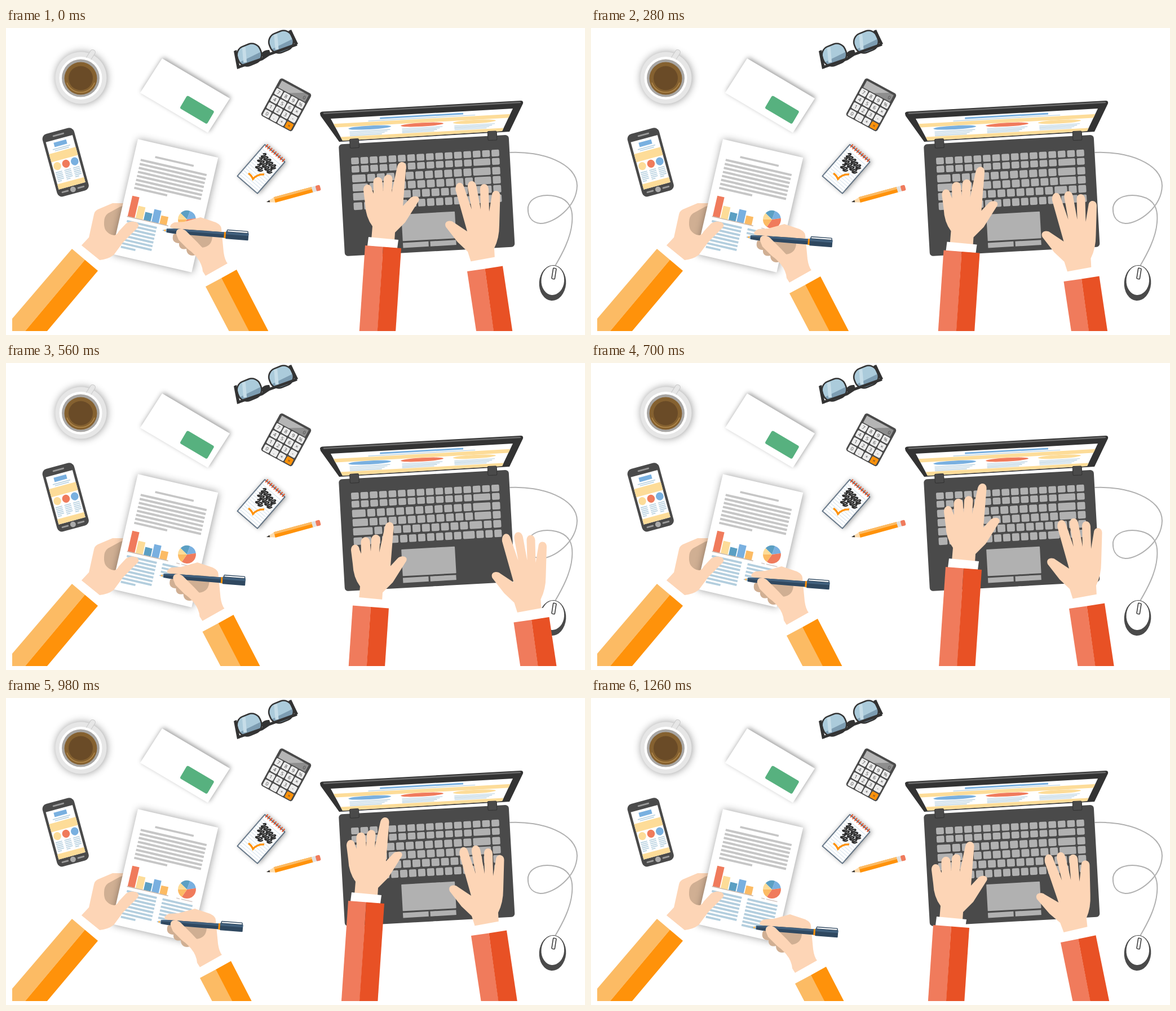
An HTML page that plays this animation: 1027x545 px, repeating every 1.4 s.

```html
<!DOCTYPE html>
<html lang="en">
<head>
<meta charset="utf-8">
<title>Desk work</title>
<style>
  html, body { margin: 0; width: 100%; height: 100%; overflow: hidden; background: #fff; }
  svg { display: block; width: 1027px; height: 545px; }
  text { font: 8.5px "Open Sans", Arial, sans-serif; text-anchor: middle; fill: #444; }
  .soft { filter: drop-shadow(1px 0 7px #0006); }
  .lift { filter: drop-shadow(2px -2px 4px #0006); }
</style>
</head>
<body>
<svg id="stage" viewBox="0 0 1027 545"></svg>
<script>
const C = {
  dark: '#4a4a4a', black: '#333', key: '#b1b1b1', skin: '#fdd5b6', shade: '#d0af93',
  amber: '#fcbb64', orange: '#ff920a', coral: '#f07b5c', red: '#e85125',
  cream: '#fddc98', blue: '#79b0e0', teal: '#5b9fc3', pale: '#b3cede', navy: '#2f4860'
};

const poly = (points, fill, more = '') => `<polygon points="${points}" fill="${fill}" ${more}/>`;
const path = (d, fill, more = '') => `<path d="${d}" fill="${fill}" ${more}/>`;
const rect = (x, y, w, h, fill, r = 0, more = '') =>
  `<rect x="${x}" y="${y}" width="${w}" height="${h}" rx="${r}" fill="${fill}" ${more}/>`;
const oval = (x, y, rx, ry, fill, more = '') =>
  `<ellipse cx="${x}" cy="${y}" rx="${rx}" ry="${ry}" fill="${fill}" ${more}/>`;
const stroke = (d, color, width, more = '') =>
  path(d, 'none', `stroke="${color}" stroke-width="${width}" ${more}`);
const line = (x1, y, x2, color, width, more = '') => stroke(`M${x1} ${y}H${x2}`, color, width, more);
const at = (x, y, angle, body, more = '') =>
  `<g transform="translate(${x} ${y}) rotate(${angle})" ${more}>${body}</g>`;
const repeat = (n, make) => Array.from({ length: n }, (_, i) => make(i)).join('');

function cup() {
  return `<g class="soft">${oval(133, 88.5, 45.5, 46, '#e6e6e6')}</g>` +
    at(148, 52, 33, rect(-4.5, -15, 9, 26, '#e6e6e6', 4, 'stroke="#c9c9c9"')) +
    oval(132.5, 89, 38, 38, '#fff') + oval(132.5, 89, 33.5, 33.5, '#a8a6a4') +
    oval(132.5, 89.5, 29, 29, '#856130') + oval(132.5, 89, 21.5, 21.5, '#6a4b27') +
    stroke('M108 97A26 26 0 0 0 157 97', '#b48a4b', 1.5);
}

function envelope() {
  return poly('277,54 397,125 358,186 238,115', '#fff', 'class="lift"') +
    at(321.5, 119.5, 30.5, rect(0, 0, 56, 26.5, '#57b17f', 3));
}

function glasses() {
  const lens = (x, y) => at(x, y, -22,
    rect(-21.5, -18, 43, 36, '#abcbdb', 16) +
    path('M-20 6L20 3Q21 18 5 18H-5Q-19 18 -20 6Z', '#7d9db2') +
    stroke('M-12 10L-4 -16', '#c6dde8', 6) +
    rect(-21.5, -18, 43, 36, 'none', 16, `stroke="${C.black}" stroke-width="2.6"`));
  return lens(431.5, 47.5) + lens(488, 24.5) +
    path('M452 46Q458 38 467 39L469 45Q461 46 456 54Z', C.black) +
    stroke('M411 70L454 55L466 47L516 29', C.black, 5, 'stroke-linejoin="round"') +
    poly('404,41 409,39 415,71 410,73', C.black) +
    poly('501,5 506,3 518,28 513,31', C.black);
}

function calculator() {
  const labels = '789%456×123-0.+×';
  return at(497, 136.3, 28.5,
    rect(-31.5, -38, 63, 76, C.dark, 4.5) + rect(-27, -34, 54, 13.5, '#8e8e8e', 1) +
    poly('-27,-34 18,-34 -6,-20.5 -27,-20.5', '#b5b5b5') +
    '<text x="22" y="-23.5">0</text>' +
    repeat(16, i => {
      const x = -22.2 + i % 4 * 14.8, y = -12.7 + (i >> 2) * 14.3;
      return rect(x - 6.4, y - 6, 12.8, 12, i == 15 ? C.orange : '#ededed', 2) +
        `<text x="${x}" y="${y + 3}">${labels[i]}</text>`;
    }));
}

function phone() {
  return at(105.7, 238.3, -15.3,
    rect(-29, -57.5, 58, 115, C.dark, 9) + rect(-10, -52, 21, 3, '#999', 1.5) +
    rect(-24.5, -43.5, 49, 87, '#fff') + rect(-11.5, -39, 23, 8, C.blue) +
    line(-16, -27.5, 16, C.pale, 1.5) + line(-13, -24.5, 13, C.pale, 1.5) +
    rect(-24.5, -21.5, 49, 15, C.cream) +
    [C.cream, C.coral, C.blue].map((color, i) => {
      const x = (i - 1) * 16;
      return oval(x, 2.7, 6.8, 7.2, color) +
        repeat(6, n => line(x - 6, 13.5 + n * 3.2, x + (n == 5 ? 1 : 6), C.pale, 1.6));
    }).join('') +
    rect(-24.5, 34, 49, 9.5, C.cream) + oval(0, 50, 5, 5, '#aaa') +
    rect(-21, 48.5, 13, 3, '#999', 1.5) + rect(8, 48.5, 13, 3, '#999', 1.5));
}

function notepad() {
  const word = (x, y, n) => `M${x} ${y}` + repeat(n, i => `c5 ${-7 + i % 2 * 3} 5 1 1 4s4 3 5.5 -3`);
  return at(459, 207, 41,
    rect(0, 0, 47, 74, '#fff', 0, `stroke="${C.navy}" stroke-width="1.4" class="lift"`) +
    repeat(13, i => line(1, 9 + i * 5, 46, '#d5e2ec', 1)) +
    repeat(9, i => stroke(`M${4 + i * 4.9} -4v7`, C.red, 1.8)) +
    stroke(word(9, 14, 5) + word(9, 24, 5) + word(14, 35, 2), '#2d2d2d', 2.4, 'stroke-linecap="round"')) +
    stroke('M430 258Q435 261 438 268Q446 259 458 260', C.orange, 3.4);
}

function pencil() {
  return at(462, 309, -15.2,
    poly('0,0 16,-5 16,5', '#fddcae') + poly('0,0 6,-2 6,2', C.black) +
    rect(15, -5, 70, 10, C.orange) + rect(15, -5, 70, 4, C.amber) +
    rect(84, -5, 8, 10, '#e2e2e2') + rect(91, -5, 8, 10, C.coral, 2));
}

function pieSlice(from, to, color) {
  const dot = a => `${16 * Math.sin(a * Math.PI / 180)} ${-16 * Math.cos(a * Math.PI / 180)}`;
  return path(`M0 0L${dot(from)}A16 16 0 0 1 ${dot(to)}Z`, color);
}

function paper() {
  const bars = [[13, 100, C.coral], [27.5, 115, C.cream], [42, 123, C.teal], [56.5, 114.5, C.blue], [71, 122.5, C.amber]];
  const row = i => 146 + i * 6.7;
  return at(234, 197.3, 13,
    rect(0, 0, 146, 209, '#fff', 0, 'class="soft"') + line(37, 24, 107, '#c6c6c6', 3.8) +
    repeat(8, i => line(13, 34.8 + i * 7.25, i == 7 ? 73 : 133, '#c6c6c6', 4)) +
    bars.map(([x, y, color]) => rect(x, y, 12.8, 137.5 - y, color)).join('') +
    line(12, 138, 87, '#c9b9ad', 1.5) +
    line(102, 138.5, 108, '#d9cfcc', 1.8) + line(111, 138.5, 131, '#d9cfcc', 1.8) +
    repeat(8, i => line(13.5, row(i), i == 7 ? 40 : 68, C.pale, 3.8)) +
    repeat(8, i => line(78.5, row(i), i == 7 ? 105 : 133, C.pale, 3.8, 'class="written"'))) +
    at(321, 340, 0, pieSlice(-45, 20, C.teal) + pieSlice(20, 82, C.blue) + pieSlice(82, 215, C.coral) +
      pieSlice(215, 270, C.amber) + pieSlice(270, 315, C.cream));
}

function holdingHand() {
  return path('M215 311H189L163 322Q157 325 156 331L147 372L134 386L166 412L215 380Z', C.skin) +
    path('M215 314L203 317L181 329Q174 334 174 345Q173 361 186 368H215Z', C.shade);
}

function holdingThumb() {
  return path('M134 386L147 372L175 357Q183 368 192 368Q197 367 200 361L213 347Q222 341 232 345Q239 350 231 357L208 380L191 403Q180 411 166 412Z', C.skin) +
    poly('134,386 166,412 163,431 117,392', '#fff') +
    poly('117,392 140,411.5 34,538 11,538 11,516', C.amber) +
    poly('140,411.5 163,431 73,538 34,538', C.orange);
}

function pen() {
  return at(277, 359, 4.4,
    poly('0,0 9,-3 9,3', C.blue) + rect(3, -1.5, 4, 3, C.amber) +
    poly('8,-3.5 20,-4.6 111,-5 111,5 20,4.6 8,3.5', C.navy) +
    poly('8,-3.5 20,-4.6 111,-5 111,-1 8,-1', '#42617e') +
    rect(110, -5.5, 3.5, 11, C.orange) + rect(113, -6.5, 40.5, 13, C.navy, 1) +
    rect(113, -6.5, 40.5, 5, '#42617e', 1) +
    rect(115, -9.5, 37, 3.5, '#fff', 1, `stroke="${C.navy}" stroke-width="1.4"`));
}

function writingHand() {
  return path('M297 366C293 377 299 382 307 382C306 391 313 394 320 392C320 402 328 406 336 403L346 385L312 360Z', C.shade) +
    path('M291 354Q291 348 299 345L316 344L345 336L372 345Q382 350 382 356L386 398Q388 412 393 418L354 440L349 432Q348 419 338 406L318 385L310 360Z', C.skin) +
    path('M312 358L354 359Q366 361 366 369Q366 388 347 390Z', C.shade) + pen() +
    path('M302 366C300 355 313 354 320 361L340 381Q346 388 352 393L360 420L342 412Q336 402 322 392L306 376Z', C.skin) +
    poly('354,440 393,418 409,429 354,459', '#fff') +
    poly('354,459 382,444 485,640 449,640', C.amber) +
    poly('382,444 409,429 518,640 484,640', C.orange);
}

function keyboard() {
  const one = n => Array(n).fill(1);
  const rows = [one(16), [...one(13), 2.2, 1], [1.7, ...one(11), 2.2, 1], [1.95, ...one(11), 2.1, 1],
    [2.5, ...one(10), 1.6, 1, 1], [1.2, ...one(11), 1.6, 1, 1, 1]];
  const middles = [31, 45.7, 62.4, 78.5, 94.5, 111.5];
  return rows.map((row, r) => {
    const unit = (263 - 3 * (row.length - 1)) / row.reduce((a, b) => a + b);
    const half = r < 2 ? 6 : 6.7;
    let x = 20.5;
    return row.map(w => {
      const key = rect(x, middles[r] - half, w * unit, half * 2, C.key, 2);
      x += w * unit + 3;
      return key;
    }).join('');
  }).join('');
}

function laptop() {
  const page = rect(-170, -40, 340, 80, '#fff') + line(-74, -15.5, 74, C.blue, 3) +
    line(-95, -11.7, 95, C.pale, 1.2) + rect(-170, -10, 340, 6.5, C.cream) +
    [C.blue, C.coral, C.cream].map((color, i) => {
      const x = (i - 1) * 93;
      return oval(x, 0, 38, 3.3, color) + repeat(4, n => line(x - 36, 5.5 + n * 2.3, x + 36 - n * 5, C.pale, 1.1));
    }).join('') + rect(-170, 14, 340, 14, C.cream);
  const hinge = x => rect(x, -8, 16, 16, C.dark, 2, `stroke="${C.black}"`);
  return path('M557 152Q557 149 561 148.5L913 129Q918 129 917 134L893 184L591 202L558 156Z', C.black) +
    stroke('M564 151.5L912 132', '#6b6b6b', 2.5, 'stroke-linecap="round"') +
    `<clipPath id="screen">${poly('576,161 899,143 880,183 597,200', '#000')}</clipPath>` +
    `<g clip-path="url(#screen)">${at(738, 171.5, -3.2, page)}</g>` +
    at(590, 206.5, -3.2,
      rect(0, 0, 302, 199, C.dark, 6) + hinge(20) + hinge(265) + keyboard() +
      rect(104, 130.5, 95, 47.5, C.key, 1) + rect(104, 181, 45.5, 9, C.key) + rect(152.5, 181, 46, 9, C.key));
}

function mouse() {
  return stroke('M893 221C950 218 1013 240 1013 280C1012 318 972 347 948 347C930 345 925 332 926 318C930 298 956 294 976 299C1001 305 1006 323 1004 345C1002 373 986 402 973 424', '#b0b0b0', 2) +
    at(969.5, 452.5, 4, oval(0, 0, 23.8, 31.5, C.dark) + oval(0, -4.5, 20.3, 26, '#fff')) +
    at(972, 436, 9, rect(-2.7, -9.5, 5.4, 19, '#fff', 1, `stroke="${C.black}" stroke-width="1.5"`));
}

function leftTyping() {
  return path('M648 376L650 352Q638 336 637 312L634 288C634 275 648 275 649 287L652 294L651.5 274C652 262 667 262 667.5 273L669 290L670 268C672 257 686 258 685.5 269L684 292L694 246C697 234 711 236 709.5 248L704 316L716 303C722 296 736 298 732 307L708 345L690 363L689 378Z', C.skin) +
    poly('643,371 696,376 694,391 641,387', '#fff') +
    poly('637,386 669,388.5 655,600 622.5,600', C.coral) + poly('669,388.5 701,391 687,600 654.5,600', C.red);
}

function rightTyping() {
  return path('M825 416L819 397L801 380L780 353C776 343 787 340 794 345L818 361L797.5 288C796 272 810 270 813 284L826 322L819 283C818 269 832 268 834.5 281L842 322L841 286C841 274 855 274 856 286L857 326L862 296C863 286 877 287 876.5 298L875 350Q875 373 866 391L867 410Z', C.skin) +
    poly('821,415 873,405.5 876,424 818,432', '#fff') +
    poly('818,432 849.5,427.5 881,650 851,650', C.coral) + poly('849.5,427.5 881,422.5 915,650 880.5,650', C.red);
}

const stage = document.getElementById('stage');
stage.innerHTML = `<clipPath id="edge">${rect(11, 0, 1016, 538, '#000')}</clipPath><g clip-path="url(#edge)">` +
  cup() + envelope() + glasses() + calculator() + phone() + notepad() + pencil() +
  holdingHand() + paper() + holdingThumb() + laptop() + mouse() +
  `<g id="writer">${writingHand()}</g><g id="left">${leftTyping()}</g><g id="right">${rightTyping()}</g></g>`;

// Each pose: writer x, y; left x, y; right x, y, turn; finished lines of writing.
const poses = [
  [0, 0, 0, 0, 0, 0, 0, 0],
  [50, 17, -5, 0, -3, -8, 0, 2],
  [-2, 12, -11.5, 8.5, 20.5, 18, 0, 2],
  [47, 24, 25, 8, -1.5, -29, 0, 3],
  [-5.5, 18, -22, 44.5, 82.5, 28.5, 0, 3],
  [-7, 25, -8, -24, 30, 4, 0, 4],
  [41, 42, -15, 21.5, -8.5, -16, 0, 6],
  [-10, 38, -30, -26, 7, -10, 0, 6],
  [39, 48.5, -60, -7, -38, -49, -10, 7],
  [8, 48, -30, 17, 15, 2, -3, 8]
];
const [writer, left, right] = ['writer', 'left', 'right'].map(id => document.getElementById(id));
const written = document.querySelectorAll('.written');
const move = (part, x, y, turn = '') => part.setAttribute('transform', `translate(${x} ${y}) ${turn}`);

function draw() {
  const [wx, wy, lx, ly, rx, ry, turn, lines] = poses[Math.floor(performance.now() / 140) % poses.length];
  move(writer, wx, wy);
  move(left, lx, ly);
  move(right, rx, ry, `rotate(${turn} 818 432)`);
  written.forEach((el, i) => el.setAttribute('visibility', i < lines ? 'visible' : 'hidden'));
  requestAnimationFrame(draw);
}
draw();
</script>
</body>
</html>
```
